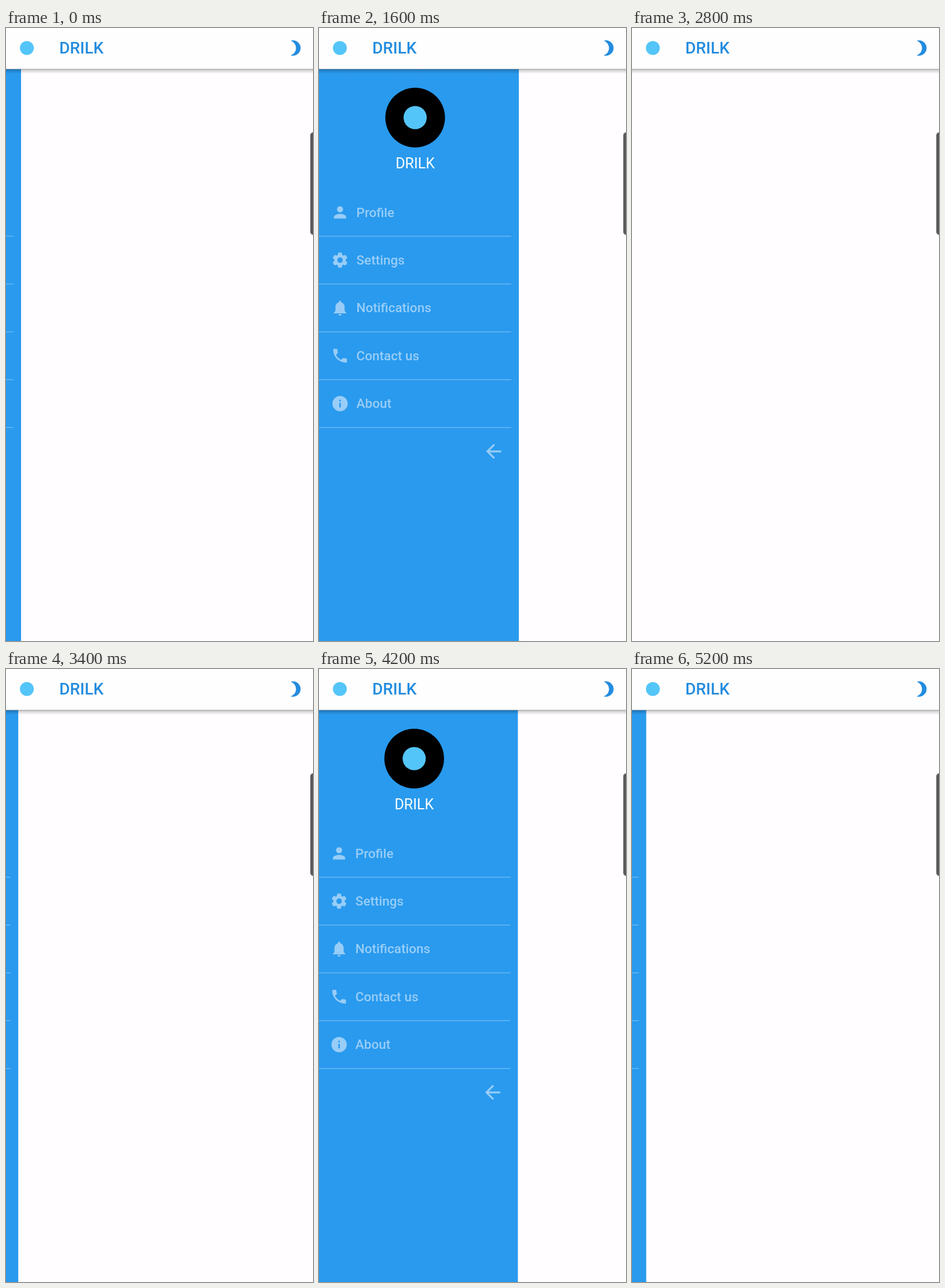
These frames come from a looping animation (530 px wide and 1057 px high, 5300 ms). An HTML page:

```html
<!DOCTYPE html>
<html lang="en">
<head>
<meta charset="utf-8">
<title>Elastic drawer</title>
<style>
  html, body { margin: 0; width: 100%; height: 100%; overflow: hidden; background: #fffdff; }
  svg { display: block; width: 100%; height: 100%; font-family: Roboto, Arial, sans-serif; }
  .soft { fill: #98cdf7; }
  .label { font-size: 22.5px; font-weight: 500; }
</style>
</head>
<body>
<svg viewBox="0 0 530 1057">
  <defs>
    <linearGradient id="shade" x2="0" y2="1">
      <stop offset="0" stop-opacity=".4"/>
      <stop offset=".3" stop-opacity=".18"/>
      <stop offset="1" stop-opacity="0"/>
    </linearGradient>
  </defs>
  <path id="panel" fill="#299aee"/>
  <g id="content">
    <circle cx="-179" cy="154.5" r="51.5"/>
    <circle cx="-179" cy="154.5" r="20" fill="#54c5f8"/>
    <text x="-179" y="242" font-size="25" fill="#fff" text-anchor="middle">DRILK</text>
    <g id="menu"></g>
    <path class="soft" transform="translate(-63 710.5) scale(1.625)"
      d="M20 11H7.83l5.59-5.59L12 4l-8 8 8 8 1.41-1.41L7.83 13H20z"/>
  </g>
  <rect y="70" width="530" height="9" fill="url(#shade)"/>
  <rect width="530" height="70.5" fill="#fffefe"/>
  <circle cx="36" cy="34.5" r="12" fill="#54c5f8"/>
  <text x="92" y="43.5" font-size="28" font-weight="500" fill="#238cdf">DRILK</text>
  <path fill="#238cdf" transform="translate(483.5 18.7) scale(1.32)"
    d="M9 2c-1.05 0-2.05.16-3 .46 4.06 1.27 7 5.06 7 9.54s-2.94 8.27-7 9.54c.95.3 1.95.46 3 .46a10 10 0 0 0 0-20z"/>
  <rect x="525.5" y="180" width="12" height="176.5" rx="5" fill="#585858" stroke="#8a8a8a"/>
</svg>
<script>
  const CLOSED = 26, OPEN = 345, LOOP = 5300, TICK = 100;
  const SPRING = 1500, BULGE = 150;

  // Each move: start time, edge from and to, height of the bulge
  const moves = [
    { start: 1150, from: CLOSED, to: OPEN, bulge: 50 },
    { start: 2580, from: OPEN, to: CLOSED, bulge: 92 },
    { start: 3465, from: CLOSED, to: OPEN, bulge: 50 },
    { start: 4435, from: OPEN, to: CLOSED, bulge: 92 }
  ];

  const tooth = a => `<path transform="rotate(${a} 12 12)" d="M8.9 6L9.7 2.2H14.3L15.1 6z"/>`;
  const items = [
    ["Profile", '<circle cx="12" cy="8" r="4"/><path d="M12 14c-2.67 0-8 1.34-8 4v2h16v-2c0-2.66-5.33-4-8-4z"/>'],
    ["Settings", '<circle cx="12" cy="12" r="5.5" fill="none" stroke="#98cdf7" stroke-width="3.8"/>' +
      [0, 60, 120, 180, 240, 300].map(tooth).join("")],
    ["Notifications", '<path d="M12 22a2 2 0 0 0 2-2h-4a2 2 0 0 0 2 2zm6-6v-5c0-3.07-1.64-5.64-4.5-6.32V4a1.5 1.5 0 0 0-3 0v.68C7.63 5.36 6 7.92 6 11v5l-2 2v1h16v-1z"/>'],
    ["Contact us", '<path d="M6.62 10.79c1.44 2.83 3.76 5.14 6.59 6.59l2.2-2.2q.45-.43 1.02-.24 1.7.57 3.57.57a1 1 0 0 1 1 1V20a1 1 0 0 1-1 1A17 17 0 0 1 3 4a1 1 0 0 1 1-1h3.5a1 1 0 0 1 1 1q0 1.87.57 3.57.16.58-.25 1.02z"/>'],
    ["About", '<path fill-rule="evenodd" d="M12 2a10 10 0 0 0 0 20 10 10 0 0 0 0-20zM11 11h2v6h-2zM11 7h2v2h-2z"/>']
  ];

  const find = id => document.getElementById(id);
  const panel = find("panel"), content = find("content");

  find("menu").innerHTML = items.map(([name, icon], i) => `
    <g transform="translate(0 ${i * 82.45})">
      <g class="soft" transform="translate(-324.5 302) scale(1.32)">${icon}</g>
      <text class="soft label" x="-280.5" y="325.5">${name}</text>
      <rect x="-345" y="358.3" width="332" height="1.5" fill="#fff" opacity=".3"/>
    </g>`).join("");

  function elasticOut(u) {
    if (u >= 1) return 1;
    return 1 + 2 ** (-10 * u) * Math.sin((u - 0.1) * 5 * Math.PI);
  }

  function pose(t) {
    const move = moves.filter(m => m.start <= t).pop();
    if (!move) return [CLOSED, 0];
    const age = t - move.start;
    const edge = move.from + (move.to - move.from) * elasticOut(age / SPRING);
    const bulge = age < BULGE ? move.bulge * Math.sin(Math.PI * Math.sqrt(age / BULGE)) : 0;
    return [edge, bulge];
  }

  function draw(now) {
    const t = Math.floor((now % LOOP) / TICK) * TICK;
    const [edge, bulge] = pose(t);
    panel.setAttribute("d", `M-100 71H${edge}Q${edge + 2 * bulge} 382 ${edge} 1164H-100z`);
    content.setAttribute("transform", `translate(${edge} 0)`);
  }

  const begin = performance.now();
  function loop() {
    draw(performance.now() - begin);
    requestAnimationFrame(loop);
  }
  loop();
</script>
</body>
</html>
```
